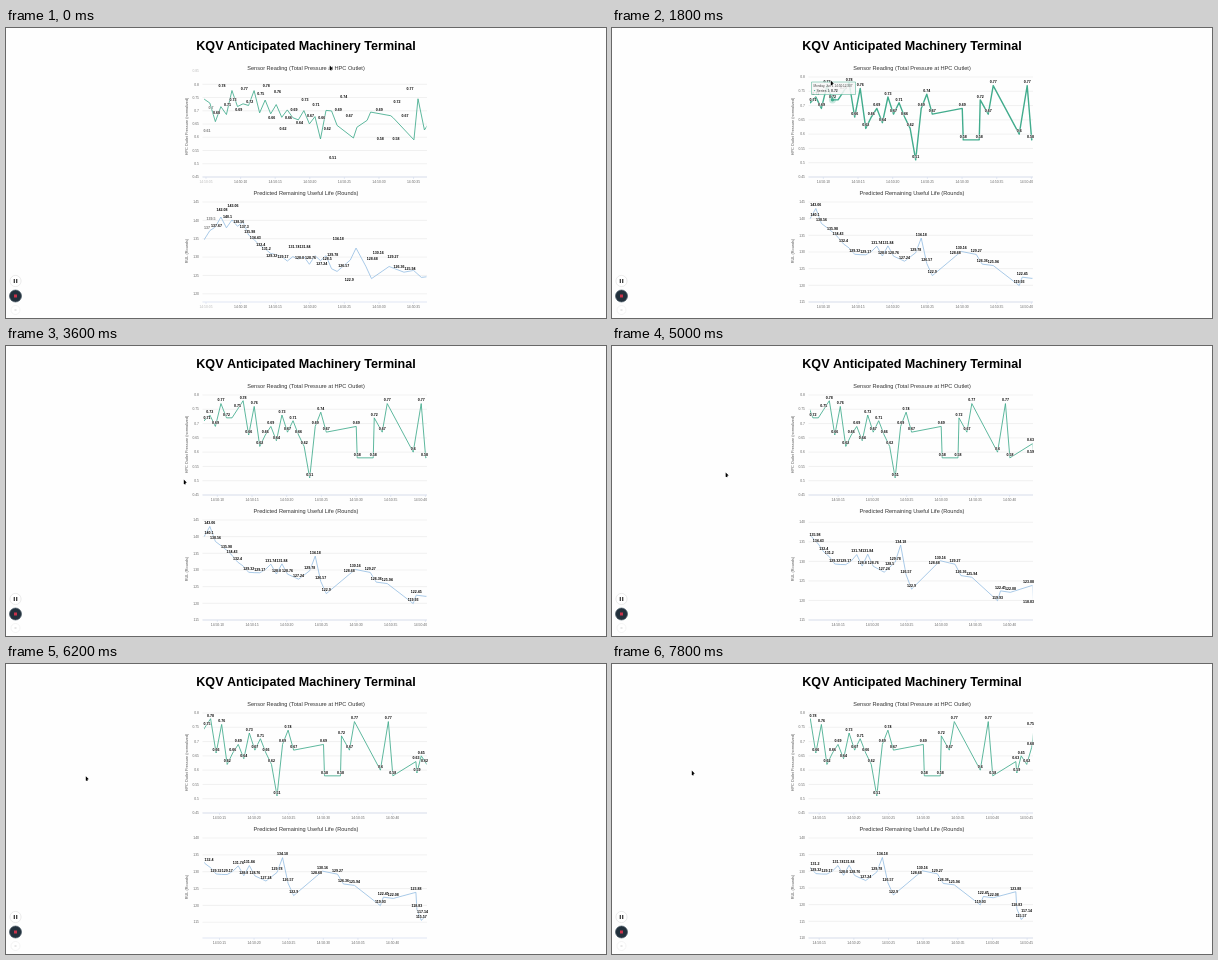
Animation, 600 px wide and 290 px high, one loop 8000 ms. Source, as an HTML page with a canvas:

```html
<!DOCTYPE html>
<html lang="en">
<head>
<meta charset="utf-8">
<title>Maintenance charts</title>
<style>
  html, body { margin: 0; width: 600px; height: 290px; overflow: hidden; background: #fefefe; }
  canvas { display: block; }
</style>
</head>
<body>
<canvas id="stage" width="600" height="290"></canvas>
<script>
const ctx = document.getElementById('stage').getContext('2d');
const LOOP = 8000, STEP = 200, LEFT = 196.5, RIGHT = 421;
const FONT = '"Liberation Sans", Arial, sans-serif';

// Readings arrive in even slots at first, then in irregular bursts.
const slot = i => 192.4 + 5.55 * i;
const series = (even, bursts) => [...even.map((v, i) => [slot(i - 5), v]), ...bursts];

const pressure = {
  top: 49, step: .05, color: '#42ac8d', width: .85,
  title: 'Sensor Reading (Total Pressure at HPC Outlet)', titleY: 42.3,
  axis: 'HPC Outlet Pressure (normalized)', axisY: 98.5, timeY: 153.5,
  data: series([.8, .68, .61, .7, .68, .78, .71, .73, .69, .77, .72, .72, .75, .78, .66,
    .76, .62, .66, .69, .64, .73, .67, .71, .66, .62, .51, .69, .74, .67],
  [[350, .69], [351, .58], [367, .58], [368, .72], [376, .67], [381, .77], [407, .6], [415, .77],
    [419.5, .58], [442.6, .63], [443.6, .59], [448, .65], [453.5, .62], [458.5, .68], [461, .75]])
};

const life = {
  top: 174, step: 5, color: '#93bde3', width: .8,
  title: 'Predicted Remaining Useful Life (Rounds)', titleY: 167.2,
  axis: 'RUL (Rounds)', axisY: 223, timeY: 279,
  data: series([133, 134, 137, 139.5, 137.67, 142.08, 140.1, 143.06, 138.56, 137.3, 135.98,
    134.43, 132.4, 131.2, 129.32, 129.2, 129.17, 130.1, 131.74, 128.8, 131.84, 128.76, 128,
    127.24, 128.5, 129.78, 134.18, 126.57, 122.9],
  [[343, 128.68], [349, 130.16], [364, 129.27], [370, 126.36], [381, 125.94], [407, 119.93],
    [410, 122.45], [420, 122.08], [442.6, 123.88], [443.6, 118.83], [448, 115.57], [453.5, 117.14]])
};

// The charts scroll from one window of readings to the next.
const span = (first, to) => ({ from: slot(first), to });
const windows = [span(-5, 386), span(-1, 411), span(1, 420), span(5, 445), span(7, 453.5), span(8, 459)];
const starts = [-420, 700, 4300, 5450, 6700], MOVE = 900, LAG = 4;

const clamp = (v, lo, hi) => Math.min(hi, Math.max(lo, v));
const mix = (a, b, p) => a + (b - a) * p;
const ease = p => (1 - Math.cos(Math.PI * clamp(p, 0, 1))) / 2;

// Value range of the visible readings, padded and rounded to whole ticks.
function range(c, w) {
  const seen = c.data.filter(([u]) => u > w.from - .1 && u < w.to + .1).map(d => d[1]);
  const lo = Math.min(...seen), hi = Math.max(...seen), pad = (hi - lo) * .05;
  return [Math.floor((lo - pad) / c.step) * c.step, Math.ceil((hi + pad) / c.step) * c.step];
}

function scale(c, a, b, p) {
  const from = mix(a.from, b.from, p), to = mix(a.to, b.to, p);
  const [lo, hi] = range(c, a).map((n, i) => mix(n, range(c, b)[i], p));
  return {
    lo, hi,
    x: u => 198.3 + (u - from) / (to - from) * 221.9,
    y: n => c.top + (hi - n) / (hi - lo) * 100
  };
}

function cursorAt(t) {
  let x = 325, y = 40;
  const go = (start, time, x1, y1) => {
    const p = ease((t - start) / time);
    x = mix(x, x1, p);
    y = mix(y, y1, p);
  };
  go(1000, 800, 220, 55);
  go(2600, 800, 179, 136);
  go(4400, 1000, 81, 125);
  go(5600, 1000, 81, 109);
  return [x, y];
}

function text(str, x, y, size, color, align = 'center', weight = 'normal') {
  ctx.font = `${weight} ${size}px ${FONT}`;
  ctx.fillStyle = color;
  ctx.textAlign = align;
  ctx.fillText(str, x, y);
}

function stroke(points, color, width) {
  ctx.beginPath();
  points.forEach(([x, y]) => ctx.lineTo(x, y));
  ctx.strokeStyle = color;
  ctx.lineWidth = width;
  ctx.stroke();
}

function disc(x, y, r, fill, edge) {
  ctx.beginPath();
  ctx.arc(x, y, r, 0, 7);
  ctx.fillStyle = fill;
  ctx.fill();
  if (edge) {
    ctx.strokeStyle = edge;
    ctx.lineWidth = .7;
    ctx.stroke();
  }
}

function drawAxes(c, s) {
  const bottom = c.top + 100;
  text(c.title, 300, c.titleY, 5.62, '#333');
  for (let i = Math.ceil(s.lo / c.step - .01); i * c.step < s.hi + c.step; i++) {
    const y = s.y(i * c.step), inside = y > c.top - .5;
    if (y < c.top - 9) continue;
    if (inside) stroke([[LEFT, y], [RIGHT, y]], '#e8e8e8', .6);
    text(String(+(i * c.step).toFixed(2)), 193, y + 1.2, 3.4, inside ? '#666' : '#bbb', 'right');
  }
  stroke([[LEFT, bottom], [RIGHT, bottom]], '#ccd6eb', .6);
  for (let sec = 5; sec <= 45; sec += 5) {
    const x = s.x(211 + (sec - 10) * 6.94);
    if (x < 200 || x > 421) continue;
    stroke([[x, bottom], [x, bottom + 2]], '#ccd6eb', .5);
    text('14:50:' + String(sec).padStart(2, '0'), Math.min(x, 414.5), c.timeY + 1.2, 3.4,
      x < 206 ? '#bbb' : '#666');
  }
  ctx.save();
  ctx.translate(182.4, c.axisY);
  ctx.rotate(-Math.PI / 2);
  text(c.axis, 0, 0, 3.8, '#555');
  ctx.restore();
}

function drawLine(c, line, width) {
  ctx.save();
  ctx.beginPath();
  ctx.rect(198, c.top - 1, 222.5, 102);
  ctx.clip();
  stroke(line, c.color, width);
  ctx.restore();
}

// Labels stay inside the plot, skip overlaps and fade as their reading leaves.
function drawLabels(c, s, next, p) {
  const placed = [];
  for (const [u, n] of c.data) {
    const str = String(n), half = str.length > 4 ? 5.5 : 3.5;
    const at = s.x(u), x = clamp(at, 197.5 + half, 422 - half), y = s.y(n) - 2.2;
    if (at < 198 || at > 423) continue;
    if (placed.some(([a, b]) => Math.abs(a - x) < half * 1.72 && Math.abs(b - y) < 4.4)) continue;
    placed.push([x, y]);
    ctx.globalAlpha = u < next.from - .1 ? 1 - p : 1;
    ctx.font = `bold 3.6px ${FONT}`;
    ctx.textAlign = 'center';
    ctx.strokeStyle = '#fff';
    ctx.lineWidth = .7;
    ctx.strokeText(str, x, y);
    text(str, x, y, 3.6, '#000', 'center', 'bold');
  }
  ctx.globalAlpha = 1;
}

function drawTooltip(s) {
  const x = s.x(slot(5)), y = s.y(.72), green = pressure.color;
  disc(x, y, 3.6, 'rgba(53,170,137,.25)');
  disc(x, y, 1.7, green);
  ctx.fillStyle = 'rgba(247,247,247,.85)';
  ctx.fillRect(199.5, 54, 44, 12.5);
  ctx.strokeStyle = green;
  ctx.lineWidth = .5;
  ctx.strokeRect(199.5, 54, 44, 12.5);
  text('Monday, Jun 1 14:50:12.307', 201.5, 59, 3.1, '#444', 'left');
  disc(202.5, 62.6, .7, green);
  text('Series 1:', 204.5, 63.8, 3.5, '#333', 'left');
  text('0.72', 219, 63.8, 3.5, '#333', 'left', 'bold');
}

function drawToolbar() {
  disc(9.5, 253, 5.6, '#fff', '#e2e2e2');
  ctx.fillStyle = '#333';
  ctx.fillRect(7.7, 251, 1.2, 4);
  ctx.fillRect(10.1, 251, 1.2, 4);
  disc(9.5, 268, 6, '#22303c', '#4b5b66');
  ctx.fillStyle = '#c8324a';
  ctx.fillRect(8, 266.5, 3, 3);
  disc(9.5, 282, 4.5, '#fff', '#f0f0f0');
  stroke([[8.5, 282], [10.5, 282]], '#bbb', .7);
}

function drawCursor([x, y]) {
  ctx.beginPath();
  [[-1.2, -2.4], [-1.2, 1.9], [.5, 2.5], [.6, .8], [1.9, .7]]
    .forEach(([a, b]) => ctx.lineTo(x + a, y + b));
  ctx.closePath();
  ctx.strokeStyle = '#fff';
  ctx.lineWidth = .7;
  ctx.stroke();
  ctx.fillStyle = '#000';
  ctx.fill();
}

function draw(now) {
  const t = Math.floor(now % LOOP / STEP) * STEP;
  const move = starts.findLastIndex(start => t >= start);
  const p = ease((t - starts[move]) / MOVE);
  const prev = windows[move], next = windows[move + 1];
  const hover = t >= 1600 && t < 3000;

  ctx.fillStyle = '#fefefe';
  ctx.fillRect(0, 0, 600, 290);
  ctx.lineJoin = 'round';
  text('KQV Anticipated Machinery Terminal', 300, 21.5, 12.55, '#000', 'center', 'bold');

  for (const c of [pressure, life]) {
    const s = scale(c, prev, next, p);
    const trace = view => c.data.map(([u, n]) => [view.x(u), view.y(n)]);
    let line = trace(s);
    if (move === 0) {
      // The first scroll morphs each vertex from an earlier reading.
      const old = trace(scale(c, prev, prev, 0)), fresh = trace(scale(c, next, next, 0));
      line = fresh.map((pt, i) => pt.map((v, k) => mix(old[Math.max(0, i - LAG)][k], v, p)));
    }
    drawAxes(c, s);
    drawLine(c, line, hover && c === pressure ? 1.4 : c.width);
    drawLabels(c, s, next, p);
    if (hover && c === pressure) drawTooltip(s);
  }
  drawToolbar();
  drawCursor(cursorAt(t));
}

let begin;
function tick(now) {
  begin ??= now;
  draw(now - begin);
  requestAnimationFrame(tick);
}
requestAnimationFrame(tick);
</script>
</body>
</html>
```
